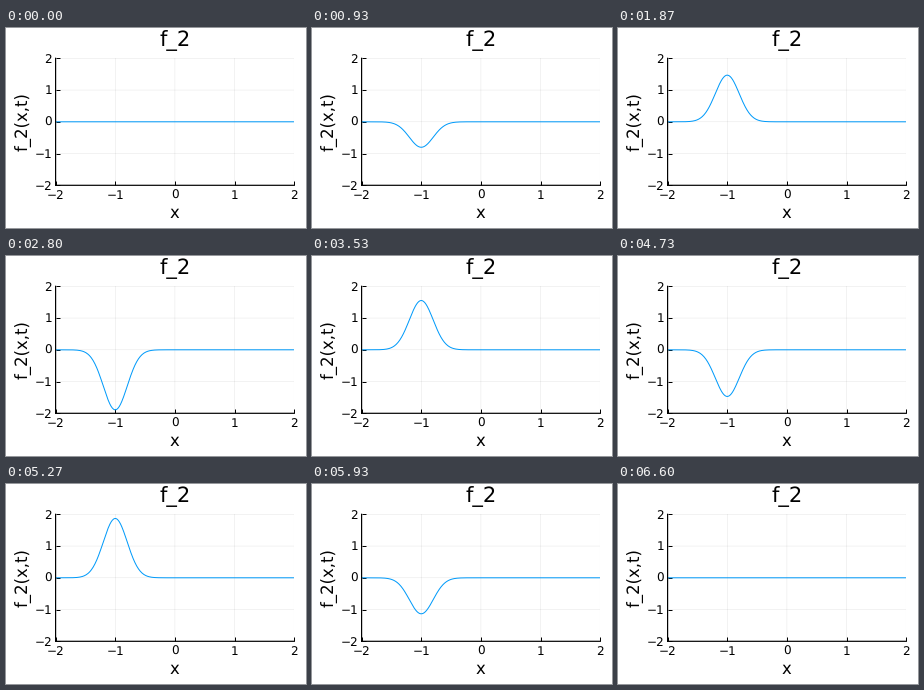
A matplotlib script for the animation above (6.67 s loop, 300 px wide and 200 px high).

```python
import numpy as np
import matplotlib.pyplot as plt
from matplotlib.animation import FuncAnimation

W, H, DPI = 300, 200, 100
STEPS, SUB, LOOP_MS = 100, 3, 6670  # poses, draws per pose, loop length
LEFT, RIGHT, TOP, BOTTOM = 49.6, 288.2, 30.3, 157.3
PX = 72 / DPI  # points per pixel

plt.rcParams.update({"font.family": "DejaVu Sans", "text.hinting": "no_hinting"})

fig = plt.figure(figsize=(W / DPI, H / DPI), dpi=DPI, facecolor="white")
ax = fig.add_axes([LEFT / W, 1 - BOTTOM / H, (RIGHT - LEFT) / W, (BOTTOM - TOP) / H])
ax.set(xlim=(-2, 2), ylim=(-2, 2))
ticks = range(-2, 3)
ax.set_xticks(ticks, [])
ax.set_yticks(ticks, [])
ax.tick_params(direction="in", length=4 * PX, width=PX)
ax.grid(color="black", alpha=0.1, linewidth=0.5 * PX, snap=False)
ax.set_axisbelow(True)
for side in ("top", "right"):
    ax.spines[side].set_visible(False)
for side in ("left", "bottom"):
    ax.spines[side].set(linewidth=1.2 * PX, snap=False)


def label(x, y, text, size, **kw):
    """Place text at pixel coordinates measured from the top left."""
    kw = {"ha": "center", "va": "baseline", **kw}
    fig.text(x / W, 1 - y / H, text, fontsize=size * PX, **kw)


for v in ticks:
    text = str(v).replace("-", "\u2212")
    label(LEFT + (v + 2) * (RIGHT - LEFT) / 4, 171.2, text, 12)
    label(46.2, BOTTOM - (v + 2) * (BOTTOM - TOP) / 4 + 4.4, text, 12, ha="right")

label(169.5, 18, "f_2", 21)
label(168.9, 190, "x", 16.5)
label(26, 94, "f_2(x,t)", 16.5, rotation=90, ha="right", va="center")

x = np.linspace(-2, 2, 401)
bump = np.exp(-(((x + 1) / 0.2) ** 2) / 2)
line, = ax.plot(x, 0 * x, color="#009afa", linewidth=PX, snap=False)


def update(i):
    # Each pose is held for SUB draws, centred on its nominal time.
    step = min(round(i / SUB), STEPS - 1)
    line.set_ydata(2 * np.sin(8 * np.pi * step / (STEPS - 1)) * bump)
    return line,


anim = FuncAnimation(fig, update, frames=STEPS * SUB, interval=LOOP_MS / (STEPS * SUB),
                     repeat=True, repeat_delay=0)
plt.show()
```
